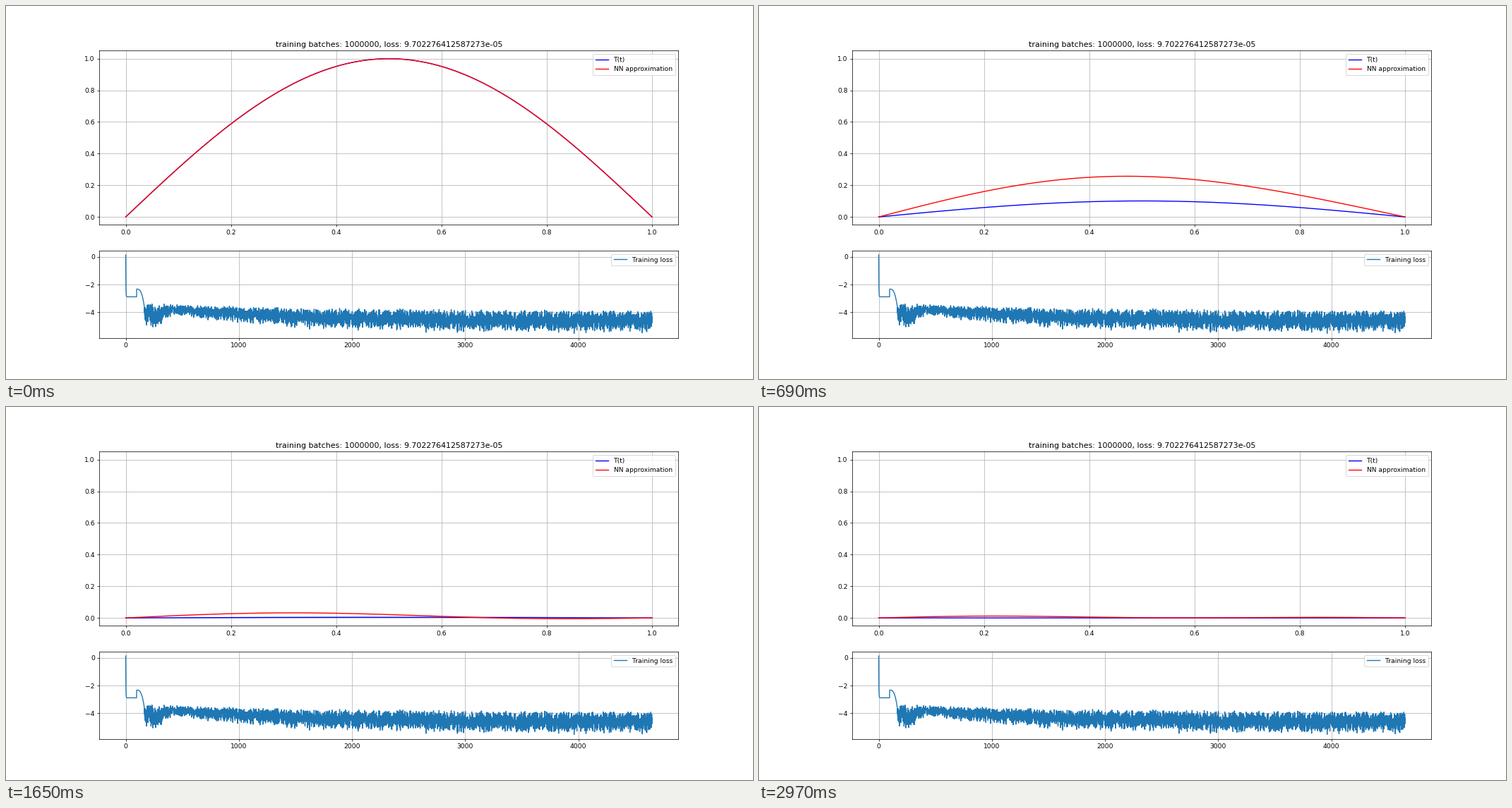
Recreate the animation shown at these times as a matplotlib script. Size 1058 by 529 pixels, loop 3 s.

```python
import numpy as np
import matplotlib.pyplot as plt
from matplotlib.animation import FuncAnimation

FRAMES = 100
INTERVAL = 30
STEPS = 4651


def bell(v, center, width):
    return np.exp(-((v - center) / width) ** 2)


def exact_curve(t):
    """Heat equation solution for a sine start."""
    return np.exp(-np.pi ** 2 * t) * waves[0]


def network_curve(t):
    """Decays more slowly than the exact curve and keeps a small residual."""
    rise = 1 - np.exp(-t / .05)
    a1 = np.exp(-4.22 * t - 7.15 * t ** 2) + .0265 * bell(t, .757, .2)
    a2 = .012 * rise + .005 * bell(t, .55, .17) - .0078 * t ** 6
    a3 = -.001 * rise + .0054 * t ** 10
    return np.array([a1, a2, a3]) @ waves


def loss_history():
    """Log10 loss: a drop, a hump, then noise in a slowly sinking band."""
    rng = np.random.default_rng(4)
    n = np.arange(STEPS)
    drop = -2.88 + 3.03 * np.exp(-n / 1.5)
    hump = -2.32 - 1.3 * ((n - 97) / 68) ** 3
    top = -3.23 - .19 * np.log(np.maximum(n, 165) / 165)
    depth = .85 + .9 * (1 - bell(n, 0, 1200)) + 1.1 * bell(n, 240, 110)
    noise = top - depth * rng.beta(2.2, 3, STEPS)
    return np.where(n < 97, drop, np.where(n < 165, hump, noise))


fig, (ax, ax_loss) = plt.subplots(
    2, 1, figsize=(16, 8), dpi=66.125,
    gridspec_kw=dict(height_ratios=[2, 1], left=.125, right=.9,
                     bottom=.11, top=.88, hspace=.2))

x = np.linspace(0, 1, 201)
waves = np.sin(np.pi * np.outer([1, 2, 3], x))

exact, = ax.plot(x, waves[0], color="blue", label="T(t)")
approx, = ax.plot(x, waves[0], color="red", label="NN approximation")
ax.set(xlim=(-.05, 1.05), ylim=(-.05, 1.05),
       title="training batches: 1000000, loss: 9.702276412587273e-05")

ax_loss.plot(loss_history(), label="Training loss")
ax_loss.set(xlim=(-232.5, 4882.5), ylim=(-5.86, .44))

for a in (ax, ax_loss):
    a.grid()
    a.legend(loc="upper right")


def update(i):
    t = i / (FRAMES - 1)
    exact.set_ydata(exact_curve(t))
    approx.set_ydata(network_curve(t))
    return exact, approx


anim = FuncAnimation(fig, update, frames=FRAMES, interval=INTERVAL,
                     init_func=lambda: update(0), repeat=True, repeat_delay=0)
plt.show()
```
